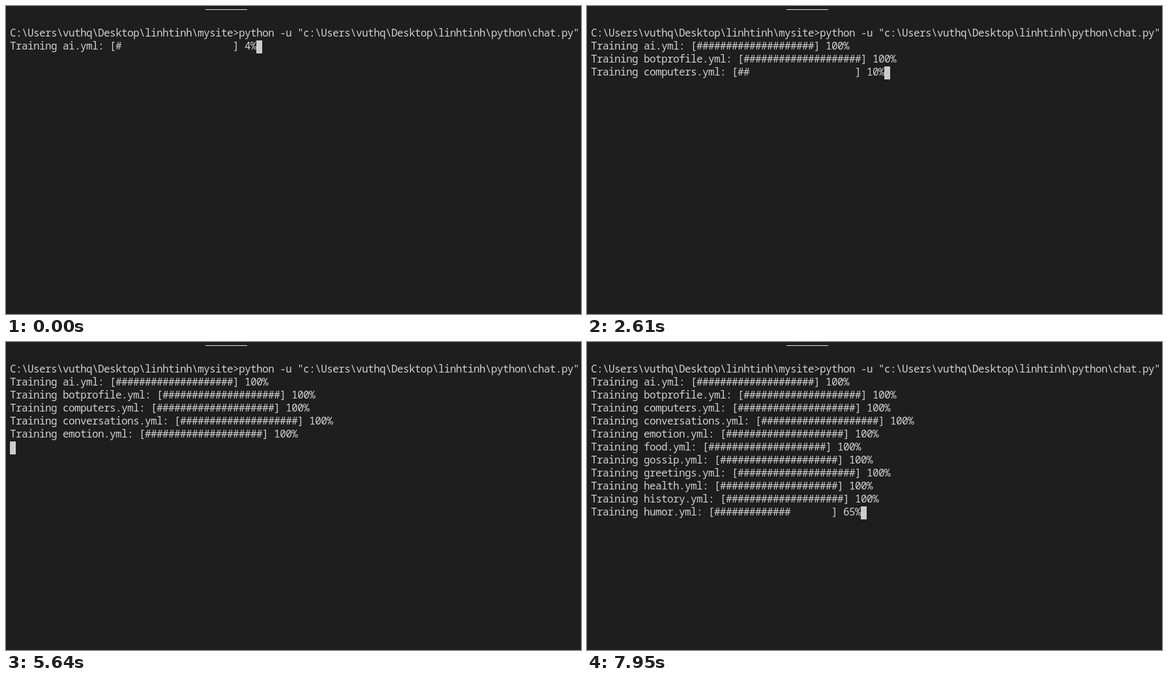
Recreate the animation shown at these times as an HTML page. Size 882x474 px, loop 8 s.

```html
<!DOCTYPE html>
<html lang="en">
<head>
<meta charset="utf-8">
<title>Terminal training log</title>
<style>
  html, body { margin: 0; width: 100%; height: 100%; overflow: hidden; background: #1e1e1e; }
  svg { display: block; width: 882px; height: 474px; }
  text {
    font: 500 16px "Noto Sans Mono", "DejaVu Sans Mono", monospace;
    letter-spacing: -0.6px;
    font-variant-ligatures: none;
    white-space: pre;
    fill: #d0d0d0;
  }
</style>
</head>
<body>
<svg id="term" viewBox="0 0 882 474">
  <rect width="882" height="474" fill="#1e1e1e"/>
  <rect x="306" y="5" width="64" height="1" fill="#e7e7e7"/>
</svg>
<script>
const LOOP = 8000, LEFT = 6, TOP = 33, CELL = 9, LINE = 20, BASELINE = 14, BAR = 20;
const COMMAND = 'C:\\Users\\vuthq\\Desktop\\linhtinh\\mysite>python -u "c:\\Users\\vuthq\\Desktop\\linhtinh\\python\\chat.py"';

// Each run: first step (ms), last step (ms), step count, first %, last %
const files = [
  { name: 'ai', runs: [[0, 0, 1, 4, 4], [70, 1490, 31, 7, 100]] },
  { name: 'botprofile', runs: [[2230, 2560, 7, 14, 100]], holdCursor: true },
  { name: 'computers', runs: [[2610, 2990, 9, 10, 100]] },
  { name: 'conversations', runs: [[3070, 3400, 6, 10, 55], [3580, 3730, 4, 64, 100]] },
  { name: 'emotion', runs: [[3910, 4190, 5, 3, 15], [4240, 4700, 10, 18, 45], [4750, 5510, 17, 48, 94], [5590, 5640, 2, 97, 100]] },
  { name: 'food', runs: [[5970, 6200, 5, 20, 100]] },
  { name: 'gossip', runs: [[6250, 6480, 5, 20, 100]] },
  { name: 'greetings', runs: [[6530, 6760, 5, 12, 64], [6810, 6910, 3, 76, 100]] },
  { name: 'health', runs: [[6960, 6960, 1, 100, 100]] },
  { name: 'history', runs: [[7240, 7560, 7, 14, 100]] },
  { name: 'humor', runs: [[7620, 7950, 7, 9, 65]] }
];

const term = document.getElementById('term');

function add(tag, attrs) {
  const el = document.createElementNS('http://www.w3.org/2000/svg', tag);
  for (const key in attrs) el.setAttribute(key, attrs[key]);
  return term.appendChild(el);
}

const addRow = i => add('text', { x: LEFT, y: TOP + i * LINE + BASELINE });
addRow(0).textContent = COMMAND;
const rows = files.map((_, i) => addRow(i + 1));
const cursor = add('rect', { width: CELL, height: LINE, fill: '#ccc' });

// Percentage shown at time t, or null before the file is reached
function percentAt(runs, t) {
  let value = null;
  for (const [start, end, steps, from, to] of runs) {
    for (let k = 0; k < steps; k++) {
      const f = steps > 1 ? k / (steps - 1) : 0;
      if (Math.round((start + f * (end - start)) / 10) * 10 > t) return value;
      value = Math.round(from + f * (to - from));
    }
  }
  return value;
}

function progressLine(name, pct) {
  const bar = '#'.repeat(Math.round(pct / 100 * BAR)).padEnd(BAR);
  return `Training ${name}.yml: [${bar}] ${pct}%`;
}

function draw(t) {
  let col = 0, row = 1;
  files.forEach(({ name, runs, holdCursor }, i) => {
    const pct = percentAt(runs, t);
    const line = pct === null ? '' : progressLine(name, pct);
    if (rows[i].textContent !== line) rows[i].textContent = line;
    if (!line) return;
    const newline = pct === 100 && !holdCursor;
    row = newline ? i + 2 : i + 1;
    col = newline ? 0 : line.length;
  });
  cursor.setAttribute('x', LEFT + col * CELL);
  cursor.setAttribute('y', TOP + row * LINE);
}

const began = performance.now();
function tick() {
  draw((performance.now() - began) % LOOP);
  requestAnimationFrame(tick);
}
draw(0);
requestAnimationFrame(tick);
</script>
</body>
</html>
```
